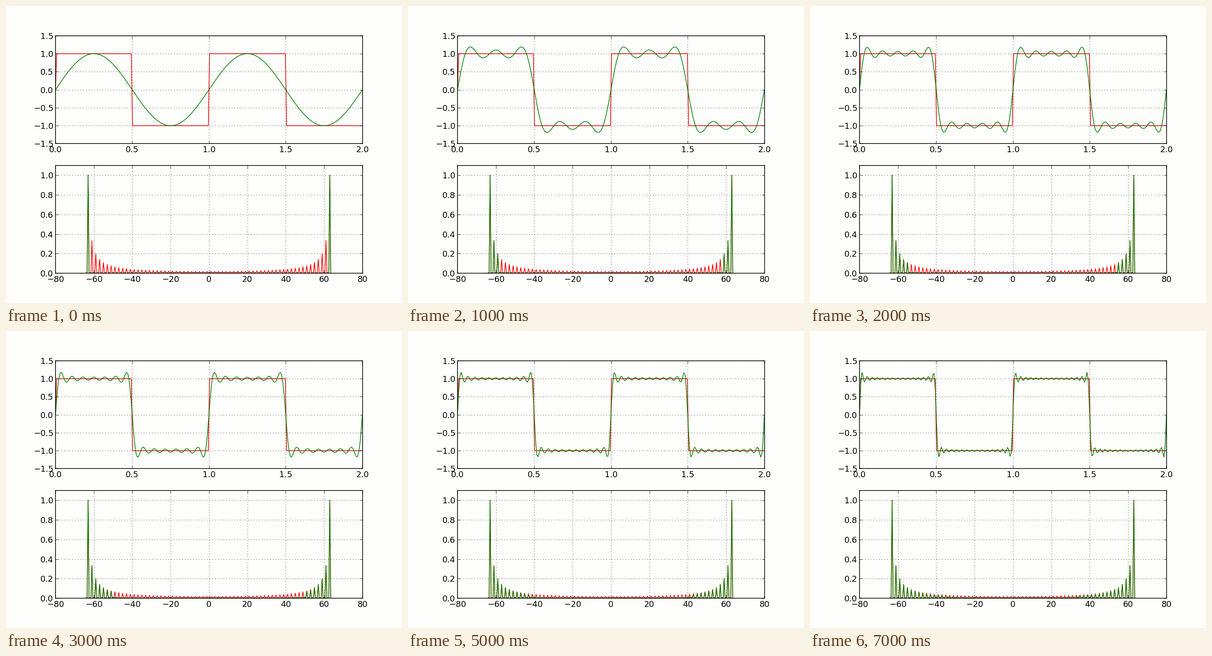
Write a matplotlib script that moves like this. It is 864 by 648 pixels and loops after 7.5 s.

```python
import numpy as np
import matplotlib.pyplot as plt
from matplotlib.animation import FuncAnimation

BG = "#fefefc"
SAMPLES = 256
STEPS = 15

plt.style.use("classic")
plt.rcParams.update({
    "font.family": "DejaVu Sans",
    "font.size": 12,
    "figure.facecolor": BG,
    "axes.facecolor": BG,
    "savefig.facecolor": BG,
    "savefig.dpi": "figure",
    "axes.grid": True,
    "lines.linewidth": 1.0,
    "xtick.major.pad": 3,
    "ytick.major.pad": 3,
    "ytick.alignment": "center_baseline",
})

t = np.linspace(0, 2, SAMPLES)
freq = np.arange(SAMPLES) / 2 - 64
square = np.sign(np.sin(2 * np.pi * t))


def partial_sum(count):
    """Fourier series of the square wave; a lone sine keeps unit height."""
    if count == 1:
        return np.sin(2 * np.pi * t)
    odd = np.arange(1, 2 * count, 2)[:, None]
    return 4 / np.pi * (np.sin(2 * np.pi * odd * t) / odd).sum(axis=0)


def spectrum(signal):
    amp = np.abs(np.fft.fft(signal))
    return amp / amp.max()


fig = plt.figure(figsize=(8, 6), dpi=108)
fig.subplots_adjust(left=0.125, right=0.9, bottom=0.1, top=0.9, hspace=0.2)
wave_ax = fig.add_subplot(2, 1, 1)
spec_ax = fig.add_subplot(2, 1, 2)

wave_ax.plot(t, square, "r")
wave_line, = wave_ax.plot(t, partial_sum(1), color="#008000")
wave_ax.set(xlim=(0, 2), ylim=(-1.5, 1.5),
            xticks=np.arange(0, 2.1, 0.5), yticks=np.arange(-1.5, 1.6, 0.5))

spec_ax.plot(freq, spectrum(square), "r")
spec_line, = spec_ax.plot(freq, spectrum(partial_sum(1)), color="#008000")
spec_ax.set(xlim=(-80, 80), ylim=(0, 1.1),
            xticks=np.arange(-80, 81, 20), yticks=np.arange(0, 1.1, 0.2))


def update(step):
    wave = partial_sum(step + 1)
    wave_line.set_ydata(wave)
    spec_line.set_ydata(spectrum(wave))
    return wave_line, spec_line


anim = FuncAnimation(fig, update, frames=STEPS, interval=500,
                     repeat=True, repeat_delay=0, blit=False)
plt.show()
```
